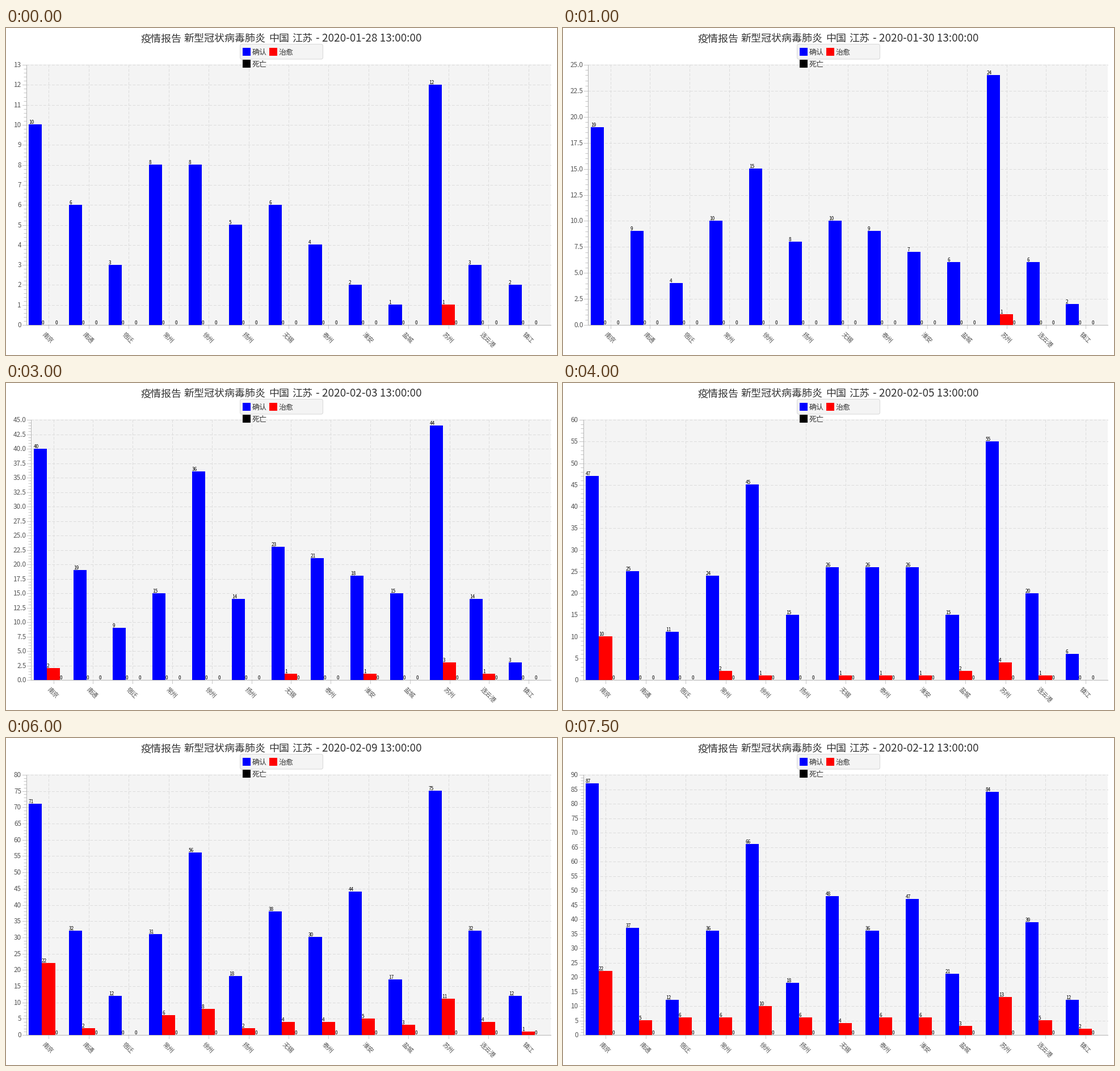
Animation of 971 by 577 pixels, one loop 8000 ms. Source, as a matplotlib script:

```python
import numpy as np
import matplotlib.pyplot as plt
from matplotlib.animation import FuncAnimation
from matplotlib.patches import FancyBboxPatch, Rectangle

W, H, DPI = 971, 577, 64
PX = 72 / DPI                      # points per pixel
FONT = "Noto Sans CJK JP"
TOP, BASE, RIGHT = 64.5, 523.6, 961
BLUE, RED, BLACK = "#0000ff", "#ff0000", "#000000"
GRID, AXIS, TICK = "#dcdcdc", "#b4b4b4", "#c6c6c6"

CITIES = "南京 南通 宿迁 常州 徐州 扬州 无锡 泰州 淮安 盐城 苏州 连云港 镇江".split()
START = np.datetime64("2020-01-28")
DAYS = 16

# Known daily totals per city; the days between are interpolated.
CONFIRMED = {
    0: [10, 6, 3, 8, 8, 5, 6, 4, 2, 1, 12, 3, 2],
    2: [19, 9, 4, 10, 15, 8, 10, 9, 7, 6, 24, 6, 2],
    4: [28, 12, 8, 14, 23, 13, 13, 17, 12, 13, 34, 13, 2],
    6: [40, 19, 9, 15, 36, 14, 23, 21, 18, 15, 44, 14, 3],
    8: [47, 25, 11, 24, 45, 15, 26, 26, 26, 15, 55, 20, 6],
    12: [71, 32, 12, 31, 56, 18, 38, 30, 44, 17, 75, 32, 12],
    15: [87, 37, 12, 36, 66, 18, 48, 36, 47, 21, 84, 39, 12],
}
CURED = {
    2: [0, 0, 0, 0, 0, 0, 0, 0, 0, 0, 1, 0, 0],
    4: [2, 0, 0, 0, 0, 0, 0, 0, 1, 0, 2, 1, 0],
    6: [2, 0, 0, 0, 0, 0, 1, 0, 1, 0, 3, 1, 0],
    8: [10, 0, 0, 2, 1, 0, 1, 1, 1, 2, 4, 1, 0],
    10: [16, 2, 0, 4, 5, 1, 2, 2, 3, 2, 7, 2, 1],
    12: [22, 2, 0, 6, 8, 2, 4, 4, 5, 3, 11, 4, 1],
    15: [22, 5, 6, 6, 10, 6, 4, 6, 6, 3, 13, 5, 2],
}

fig = plt.figure(figsize=(W / DPI, H / DPI), dpi=DPI, facecolor="white")
ax = fig.add_axes([0, 0, 1, 1])
ax.set(xlim=(0, W), ylim=(H, 0))
ax.axis("off")
moving = []


def totals(table, day):
    columns = zip(*table.values())
    values = [np.interp(day, list(table), col) for col in columns]
    return np.ceil(np.array(values) - 0.5).astype(int)


def mid(v):
    return np.floor(v) + 0.5


def label(x, y, s, size, color="#333333", **kw):
    kw = {"ha": "left", "va": "baseline", "zorder": 6, **kw}
    return ax.text(x, y, s, fontsize=size * PX, family=FONT, color=color, **kw)


def box(x0, y0, x1, y1, color, z=3):
    return ax.add_patch(Rectangle((x0, y0), x1 - x0, y1 - y0, fc=color, lw=0, zorder=z))


def line(xs, ys, color, z, dashed=False):
    style = dict(dashes=(3.75, 3.75), dash_capstyle="projecting") if dashed else {}
    return ax.plot(xs, ys, color=color, lw=PX, zorder=z, **style)[0]


def draw_fixed():
    x = 237
    for word in ("疫情报告", "新型冠状病毒肺炎", "中国", "江苏"):
        label(x, 23.8, word, 18)
        x += 18 * len(word) + 5

    ax.add_patch(FancyBboxPatch((415.5, 31.5), 140, 20.5, fc="#f4f4f4", ec="#d8d8d8",
                                boxstyle="round,pad=3,rounding_size=3.5", lw=PX, zorder=4))
    for x, y, color, name in ((417, 35, BLUE, "确认"), (464, 35, RED, "治愈"),
                              (417, 56, BLACK, "死亡")):
        box(x, y, x + 14, y + 14, color, 5)
        label(x + 17, y + 12, name, 13)


def draw_axes(top, step):
    left = 35 if step != 2.5 else 43.6
    slot = (RIGHT - left - 10) / len(CITIES)
    centers = left + 5 + slot * (np.arange(len(CITIES)) + 0.5)
    edge = mid(left)
    scale = (BASE - TOP) / top

    moving.append(box(edge, 64, 960, 524, "#f4f4f4", 0))
    count = round(top / step)
    for i in range(count + 1):
        y = mid(BASE - i * step * scale)
        text = f"{i * step:.1f}" if step == 2.5 else f"{i * step}"
        moving.append(line([edge, 960], [y, y], GRID, 1, True))
        moving.append(line([edge - 7, edge], [y, y], TICK, 2))
        moving.append(label(left - 8, y + 4.2, text, 11.7, "#555555", ha="right"))
    minor = mid(BASE - np.arange(count * 5) * step / 5 * scale)
    moving.append(ax.hlines(minor, edge - 4.5, edge, color=TICK, lw=PX, zorder=2))

    for x, city in zip(centers, CITIES):
        gx = mid(x - 0.5)
        moving.append(line([gx, gx], [TOP, BASE], GRID, 1, True))
        moving.append(line([gx, gx], [524, 530], TICK, 2))
        cy = 534.5 + (len(city) + 0.9) * 3.9
        moving.append(label(x - 4, cy + 3, city, 11, "#555555", ha="center",
                            rotation=-45, rotation_mode="anchor"))

    moving.append(line([edge, edge], [TOP, 523.5], AXIS, 2))
    moving.append(line([edge, 960], [523.5, 523.5], AXIS, 4))
    return centers - slot / 2 + 0.2, (slot - 1) / 3, scale


def draw_day(day):
    while moving:
        moving.pop().remove()

    confirmed, cured = totals(CONFIRMED, day), totals(CURED, day)
    peak = confirmed.max()
    step = next(s for s in (1, 2.5, 5) if peak / s < 17.7)
    top = (peak // step + 1) * step
    lefts, width, scale = draw_axes(top, step)

    series = ((confirmed, BLUE), (cured, RED), (0 * cured, BLACK))
    for k, (values, color) in enumerate(series):
        for x, v in zip(lefts + k * width, values):
            y = BASE - v * scale
            if v:
                moving.append(box(round(x), round(y), round(x + width), 523.5, color))
            moving.append(label(round(x), round(y) - 1, str(v), 8.3, BLACK))

    moving.append(label(545.5, 23.8, f"- {START + day} 13:00:00", 19))
    return moving


draw_fixed()
anim = FuncAnimation(fig, draw_day, frames=DAYS, interval=500, repeat=True,
                     repeat_delay=0, blit=False)
plt.show()
```
